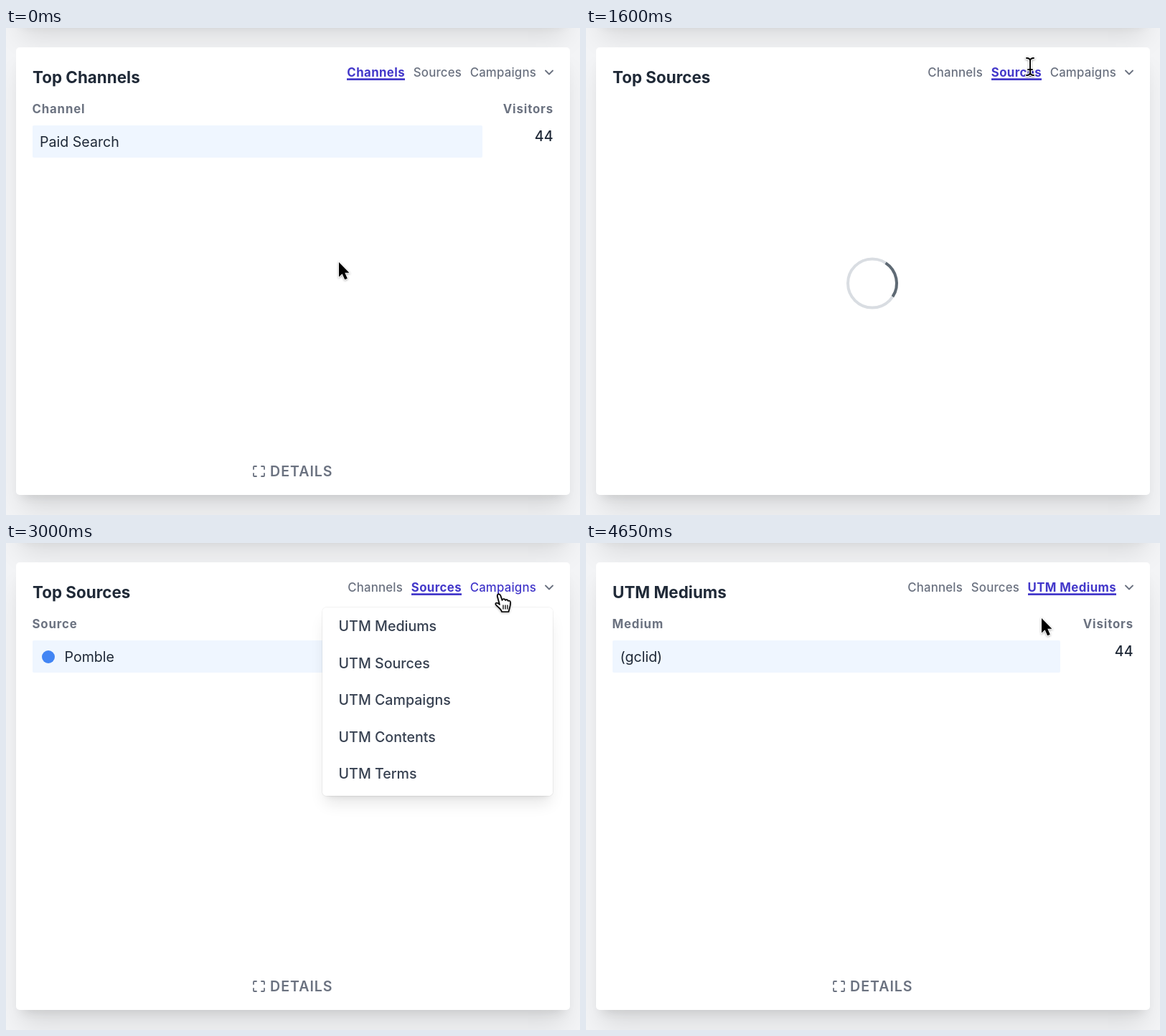
Animation, 800 px wide and 680 px high, one loop 4700 ms. Source, as an HTML page:

```html
<!DOCTYPE html>
<html lang="en">
<head>
<meta charset="utf-8">
<title>Top Channels</title>
<style>
html, body { margin: 0; width: 100%; height: 100%; overflow: hidden; }
body { position: relative; background: #f3f4f6; font-family: Inter, "Open Sans", sans-serif; font-optical-sizing: none; color: #1f2937; }
div, span, svg { position: absolute; }
span { white-space: pre; line-height: 21px; margin-top: -10.5px; }
.card { left: 14px; width: 772px; height: 625px; background: #fff; border-radius: 5px;
  box-shadow: 0 28px 35px -7px #0000001a, 0 11px 14px -8px #0000001a; }
.layer { inset: 0; }
.title { left: 37px; top: 68px; font-size: 22.4px; font-weight: 700; }
.tab { top: 62px; font-size: 16.8px; font-weight: 500; letter-spacing: .2px; color: #6b7280; }
.hover { color: #4338ca; }
.on { color: #4338ca; font-weight: 700; letter-spacing: .4px; box-shadow: inset 0 -2.8px #4338ca; }
.head { top: 113.8px; font-size: 16.8px; font-weight: 700; letter-spacing: .05em; color: #6b7280; }
.bar { left: 37px; top: 136px; height: 45px; background: #eff6ff; border-radius: 2px; }
.row { top: 159.5px; font-size: 19.6px; }
.icon { left: 50px; top: 150px; width: 18px; height: 18px; border-radius: 50%; background: #4285f4; }
.count { right: 37.5px; top: 151px; font-size: 19.6px; font-weight: 500; }
.more { left: 368px; top: 619px; font-size: 19.6px; font-weight: 600; letter-spacing: .05em; color: #6b7280; }
.menu, .shade { left: 441px; top: 90px; width: 321px; height: 263px; border-radius: 6px; }
.menu { background: #fff; overflow: hidden; }
.shade { box-shadow: 0 0 0 1px #0000000d, 0 14px 21px -4px #0000001a, 0 6px 8px -6px #0000001a; }
.menu span { left: 22.6px; font-size: 19.6px; font-weight: 500; color: #374151; }
.lit { width: 100%; height: 52px; background: #f3f5f9; }
</style>
</head>
<body>
<div class="card" style="top:-632px"></div>
<div class="card" style="top:27px"></div>
<span class="title" id="title"></span>
<span class="tab"></span><span class="tab"></span><span class="tab"></span>
<div class="layer" id="data">
  <span class="head" id="col" style="left:36.5px"></span>
  <span class="head" style="right:37px">Visitors</span>
  <div class="bar" id="bar"></div>
  <div class="icon" id="icon"></div>
  <span class="row" id="row"></span>
  <span class="count">44</span>
  <svg width="800" height="680" fill="none" stroke="#6b7280" stroke-width="1.8" stroke-linecap="round" stroke-linejoin="round">
    <path d="M345 616v-3q0-1 1-1h3M356 612h3q1 0 1 1v3M360 622v3q0 1-1 1h-3M349 626h-3q-1 0-1-1v-3"/>
  </svg>
  <span class="more">DETAILS</span>
</div>
<div class="layer" id="drop">
  <div class="shade"></div>
  <div class="menu" id="menu"><div class="lit" id="lit"></div></div>
</div>
<svg width="800" height="680" fill="none">
  <path d="M752 59.5l5 5 5-5" stroke="#6b7280" stroke-width="1.9" stroke-linecap="round" stroke-linejoin="round"/>
  <g id="spinner" stroke-width="4">
    <circle cx="399" cy="356.5" r="34" stroke="#d9dde2"/>
    <path id="arc" d="M374.96 332.46a34 34 0 0 1 48.08 0" stroke="#5f6a74"/>
  </g>
  <circle id="ring" stroke="#a3c2f0" stroke-width="5"/>
  <g id="cursor" style="filter:drop-shadow(0 1.5px 1.5px #0005)">
    <path id="arrow" d="M0 0V20.5L4.6 16.2 8.2 24.3 11.8 22.7 8.3 14.8H14.4Z" fill="#000" stroke="#fff" stroke-width="1.6" paint-order="stroke"/>
    <g id="hand" transform="translate(-6 -2)" stroke="#000" stroke-width="1.7" stroke-linejoin="round" stroke-linecap="round">
      <path fill="#fff" d="M7 17L4 6C3 2 7 1 8.3 4.5L10.5 11C11 8.5 14 8.5 15 11 16 9.3 18.5 10 18.7 12 20 11 22 11.5 22 14 22.3 19 20.5 22 19.5 27H10C9 23 5 21 2 17.5 0 15 3 13 7 17Z"/>
      <path stroke-width="1.3" d="M12 18v5M15 18v5M18 18v5"/>
    </g>
    <g id="beam" stroke-linecap="round">
      <path d="M-5-12q5 0 5 4q0-4 5-4M0-8V8M-5 12q5 0 5-4q0 4 5 4M-3 4H3" stroke="#fff" stroke-width="4"/>
      <path d="M-5-12q5 0 5 4q0-4 5-4M0-8V8M-5 12q5 0 5-4q0 4 5 4M-3 4H3" stroke="#000" stroke-width="1.9"/>
    </g>
  </g>
</svg>
<script>
const LOOP = 4700;
const $ = id => document.getElementById(id);
const clamp = v => Math.max(0, Math.min(1, v));
const ramp = (t, start, length) => clamp((t - start) / length);
const ease = p => p * p * (3 - 2 * p);
const show = (id, visible) => $(id).style.display = visible ? '' : 'none';

// from: switch time, load: data fade start, ends: right edge of each tab
const views = [
  { from: 0, load: -200, title: 'Top Channels', col: 'Channel', row: 'Paid Search', left: 47, bar: 627,
    tabs: ['Channels', 'Sources', 'Campaigns'], ends: [556, 635, 739] },
  { from: 1300, load: 1800, title: 'Top Sources', col: 'Source', row: 'Pomble', left: 81.5, bar: 626,
    tabs: ['Channels', 'Sources', 'Campaigns'], ends: [553, 635, 739] },
  { from: 4200, load: 4510, title: 'UTM Mediums', col: 'Medium', row: '(gclid)', left: 47.5, bar: 624,
    tabs: ['Channels', 'Sources', 'UTM Mediums'], ends: [525, 604, 739] }
];
const moves = [ // start, end, x, y
  [50, 550, 622, 62], [1400, 1550, 619, 54], [2150, 2600, 687, 71], [3280, 3850, 635, 105]
];
const shapes = [[0, 'arrow'], [490, 'hand'], [1350, 'beam'], [2250, 'hand'], [3850, 'arrow']];
const clicks = [1100, 2750, 4000];
const tabs = [...document.querySelectorAll('.tab')];

['Mediums', 'Sources', 'Campaigns', 'Contents', 'Terms'].forEach((name, i) => {
  const item = document.createElement('span');
  item.textContent = 'UTM ' + name;
  item.style.top = 26.5 + 51.6 * i + 'px';
  $('menu').append(item);
});

function cursorAt(t) {
  let x = 464, y = 327;
  for (const [start, end, toX, toY] of moves) {
    const p = ease(ramp(t, start, end - start));
    x += (toX - x) * p;
    y += (toY - y) * p;
  }
  return [x, y];
}

function drawView(t) {
  const index = views.findLastIndex(v => t >= v.from);
  const view = views[index];
  for (const id of ['title', 'col', 'row']) $(id).textContent = view[id];
  $('row').style.left = view.left + 'px';
  $('bar').style.width = view.bar + 'px';
  show('icon', index === 1);
  $('data').style.opacity = ramp(t, view.load, 100);

  const hovered = t >= 490 && t < 1300 ? 1 : t >= 2300 && t < 3400 ? 2 : -1;
  tabs.forEach((tab, i) => {
    tab.textContent = view.tabs[i];
    tab.style.right = 800 - view.ends[i] + 'px';
    tab.className = 'tab' + (i === index ? ' on' : i === hovered ? ' hover' : '');
  });

  const age = t - view.from;
  show('spinner', t < view.load);
  $('spinner').style.opacity = ramp(age, 0, 200);
  const turn = 360 * ease(age / 1000 % 1);
  $('arc').setAttribute('transform', `rotate(${turn} 399 356.5)`);
}

function drawPointer(t) {
  const [x, y] = cursorAt(t);
  const shape = shapes.findLast(s => t >= s[0])[1];
  for (const id of ['arrow', 'hand', 'beam']) show(id, id === shape);
  $('cursor').setAttribute('transform', `translate(${x} ${y})`);

  const age = t - (clicks.findLast(c => t >= c) ?? -LOOP);
  const ring = $('ring');
  ring.setAttribute('cx', x);
  ring.setAttribute('cy', y);
  ring.setAttribute('r', 24 + 8 * ease(ramp(age, 0, 100)));
  ring.style.opacity = ramp(age, -50, 100) * (1 - ramp(age, 150, 100));
  show('lit', y > 88);
}

function frame(now) {
  const t = now % LOOP;
  drawView(t);
  drawPointer(t);
  show('drop', t >= 2900 && t < 4200);
  $('drop').style.opacity = ramp(t, 2900, 100);
  requestAnimationFrame(frame);
}
frame(0);
</script>
</body>
</html>
```
